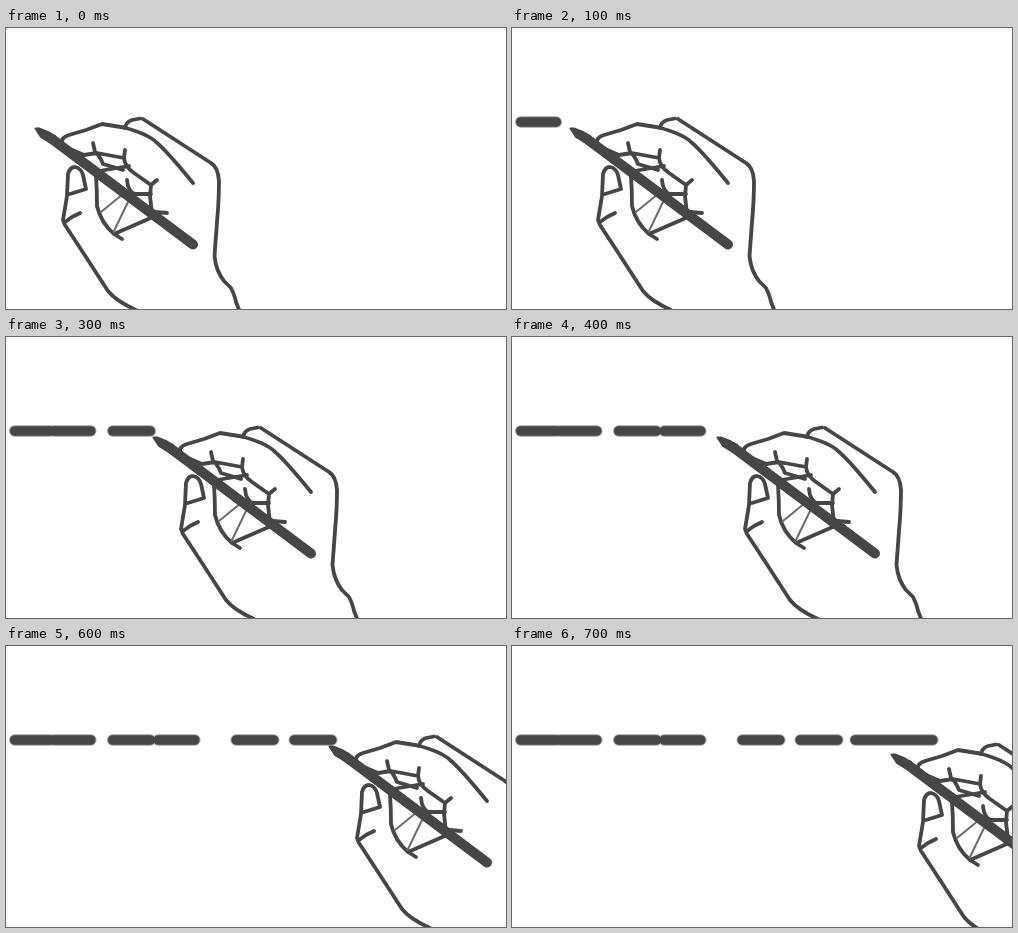
An HTML page for the animation above (0.9 s loop, 500 by 281 pixels).

```html
<!DOCTYPE html>
<html lang="en">
<head>
<meta charset="utf-8">
<title>Hand drawing dashes</title>
<style>
  html, body { margin: 0; width: 100%; height: 100%; overflow: hidden; background: #fff; }
  svg { display: block; width: 100%; height: 100%; }
  path { fill: none; stroke: #464646; stroke-linecap: round; stroke-linejoin: round; }
  #halos path { stroke: #a0a0a0; stroke-width: 11.6; }
  #inks path { stroke-width: 9.6; }
  #hand { filter: blur(.45px); }
  .line { stroke-width: 3.8; }
  .thin { stroke: #6c6c6c; stroke-width: 2; }
  .pen { stroke-width: 2; fill: #464646; }
</style>
</head>
<body>
<svg viewBox="0 0 500 281">
  <g id="halos"></g>
  <g id="inks"></g>
  <g id="hand">
    <!-- index finger and back of the hand -->
    <path class="line" d="M57 118Q53 110 63 107L80 102 96 96 118 99.500Q142 106 150 114Q160 122 187 155"/>
    <path class="line" d="M119 100Q120 94 126 92L134 90.500M137 91L171 113 205 135Q212 139 213 153Q213 172 211 194L208.500 228Q210 243 218 253L225 260Q229 268 230 274L234 284"/>
    <!-- thumb and wrist -->
    <path class="line" d="M57 192L61 168 62 146Q64 139 69 139Q75 140 77 147L80 161 64 166M57 192L59 197 78 226 102 263Q110 273 130 282M59 194L66 189 74 185"/>
    <!-- curled fingers -->
    <path class="line" d="M57 118L78 127 91 125 118 130M87 115L89 124Q94 128 97 136L117 142M119 122L118 130Q119 139 128 145L145 157M93 143L105 141 123 138M151 152L145 157 144 168 146 186M121 152Q122 164 129 166L145 166M149 184L161 185"/>
    <path class="line" d="M90 148Q91 162 91 178Q95 195 108 206L116 211M108 206L147 189"/>
    <path class="thin" d="M95 184L117 166M107.500 204L123 172"/>
    <!-- pen -->
    <path d="M46 111L187 216.500" stroke-width="10"/>
    <path class="pen" d="M29.500 100.500L33 100.500 43 104.500 49 108 43 114 35 109Z"/>
  </g>
</svg>
<script>
  const LOOP = 900, STEP = 100, Y = 94;
  const byId = id => document.getElementById(id);
  const hand = byId("hand");

  // One stroke [left, right] is added per step
  const strokes = [[3, 50], [42, 90.5], [101, 150], [146.5, 194.5], [224.5, 273.5], [282.5, 331.5], [337.5, 426.5]];
  const shifts = [0, 29, 59, 118, 176, 231, 294, 350];

  function addDash(group, [left, right]) {
    const path = document.createElementNS("http://www.w3.org/2000/svg", "path");
    path.setAttribute("d", `M${left + 5.8} ${Y}H${right - 5.8}`);
    group.append(path);
    return path;
  }

  const marks = strokes.map(stroke => [byId("halos"), byId("inks")].map(group => addDash(group, stroke)));

  function draw(time) {
    const last = shifts.length - 1;
    const step = Math.min(last, Math.floor(time % LOOP / STEP));
    hand.setAttribute("transform", `translate(${shifts[step]} ${step === last ? 8 : 0})`);
    marks.forEach((layers, i) => layers.forEach(path =>
      path.setAttribute("visibility", i < step ? "visible" : "hidden")));
  }

  const start = performance.now();
  function tick() {
    draw(performance.now() - start);
    requestAnimationFrame(tick);
  }
  tick();
</script>
</body>
</html>
```
